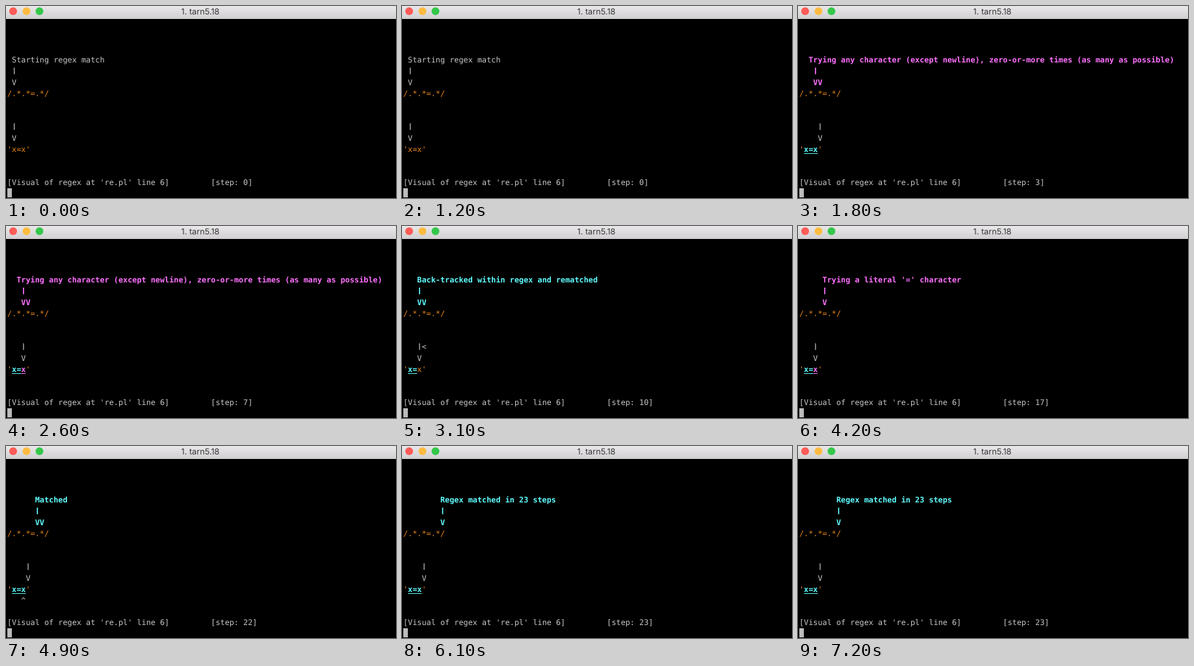
These frames come from a looping animation (600x296 px, 7500 ms). An HTML page:

```html
<!DOCTYPE html>
<html lang="en">
<head>
<meta charset="utf-8">
<title>Regex match</title>
<style>
  html, body { margin: 0; height: 100%; overflow: hidden; background: #000; }
  svg { display: block; }
  text { white-space: pre; text-rendering: geometricPrecision; }
  #screen { font: 11.83px "DejaVu Sans Mono", monospace; }
  .bold { font-weight: bold; }
  .title { font: 12.7px Inter, sans-serif; fill: #383838; text-anchor: middle; }
</style>
</head>
<body>
<svg width="600" height="296" viewBox="0 0 600 296">
  <defs>
    <linearGradient id="bar" x2="0" y2="1">
      <stop stop-color="#e9e7e9"/>
      <stop offset="1" stop-color="#d1cfd1"/>
    </linearGradient>
  </defs>
  <rect width="600" height="296"/>
  <rect width="600" height="20" fill="url(#bar)"/>
  <circle cx="11" cy="8" r="6" fill="#fc5b57"/>
  <circle cx="31.5" cy="8" r="6" fill="#fdbc40"/>
  <circle cx="51.5" cy="8" r="6" fill="#34c84a"/>
  <text class="title" x="299" y="13">1. tarn5.18</text>
  <g id="screen"></g>
  <rect x="2" y="281" width="7" height="14" fill="#bbb"/>
</svg>
<script>
const GREY = '#c7c7c7', ORANGE = '#ea861c', CYAN = '#60fdff', PINK = '#ff70ff';
const LOOP = 7500, CELL = 7.12, LINE = 17.18, LAST = 23;
const SUBJECT = 'x=x';
const screen = document.getElementById('screen');

// Column and width of each regex element
const parts = [[1, 2], [3, 2], [5, 1], [6, 2]];

// Kind (Try, Match, Back-track), element, string position
const events = ('T00 M03 T13 M13 T23 B02 T12 M13 T23 B12 T22 ' +
  'B01 T11 M13 T23 B12 T22 B11 T21 M22 T32 M33').split(' ');

const colX = col => 2 + col * CELL;
const rowY = row => 87.3 + row * LINE;
const escapeText = s => s.replace(/&/g, '&amp;').replace(/</g, '&lt;');

function put(row, col, text, color = GREY, bold = false) {
  return `<text x="${colX(col)}" y="${rowY(row)}" fill="${color}"` +
    `${bold ? ' class="bold"' : ''}>${escapeText(text)}</text>`;
}

function arrow(row, col, width, color = GREY, bold = false) {
  const w = bold ? 1.7 : 1.2;
  return `<rect x="${colX(col + 0.5) - w / 2}" y="${rowY(row) - 9.5}" ` +
    `width="${w}" height="10.2" fill="${color}"/>` +
    put(row + 1, col, 'V'.repeat(width), color, bold);
}

function marked(index, color) {
  return put(8, index + 1, SUBJECT[index], color, true) +
    `<rect x="${colX(index + 1)}" y="227" width="${CELL}" height="1" fill="${color}"/>`;
}

function describe(step) {
  if (step === 0)
    return { kind: 'S', col: 1, width: 1, pos: 0, color: GREY, text: 'Starting regex match' };
  if (step === LAST)
    return { kind: 'E', col: 8, width: 1, pos: 3, color: CYAN, text: `Regex matched in ${LAST} steps` };
  const [kind, part, pos] = events[step - 1];
  const [col, width] = parts[part];
  const text = {
    T: part === '2' ? "Trying a literal '=' character"
      : 'Trying any character (except newline), zero-or-more times (as many as possible)',
    M: 'Matched',
    B: 'Back-tracked within regex and rematched'
  }[kind];
  return { kind, col, width, pos: +pos, color: kind === 'T' ? PINK : CYAN, text };
}

function draw(step) {
  const { kind, col, width, pos, color, text } = describe(step);
  const before = step ? describe(step - 1).pos : 0;
  const bold = step > 0;

  let out = put(0, Math.min(col, 81 - text.length), text, color, bold) +
    arrow(1, col, width, color, bold) +
    put(3, 0, '/.*.*=.*/', ORANGE) +
    arrow(6, pos + 1, 1) +
    put(8, 0, "'", ORANGE) + put(8, 4, "'", ORANGE);

  for (let i = 0; i < SUBJECT.length; i++) {
    if (i < pos) out += marked(i, CYAN);
    else if (i === pos && kind === 'T') out += marked(i, PINK);
    else out += put(8, i + 1, SUBJECT[i], ORANGE);
  }

  if (pos < before) out += put(6, pos + 2, '<'.repeat(before - pos));
  if (pos > before) out += put(9, before + 1, '^'.repeat(pos - before));

  out += put(11, 0, "[Visual of regex at 're.pl' line 6]") +
    put(11, 44, `[step: ${step}]`);
  screen.innerHTML = out;
}

function stepAt(ms) {
  const t = Math.floor(ms / 100) * 100;
  if (t < 1400) return 0;
  return Math.min(LAST, Math.max(1, Math.floor((t - 1311) / 163)));
}

const start = performance.now();
let shown = -1;
function tick() {
  const step = stepAt((performance.now() - start) % LOOP);
  if (step !== shown) draw(shown = step);
  requestAnimationFrame(tick);
}
tick();
</script>
</body>
</html>
```
